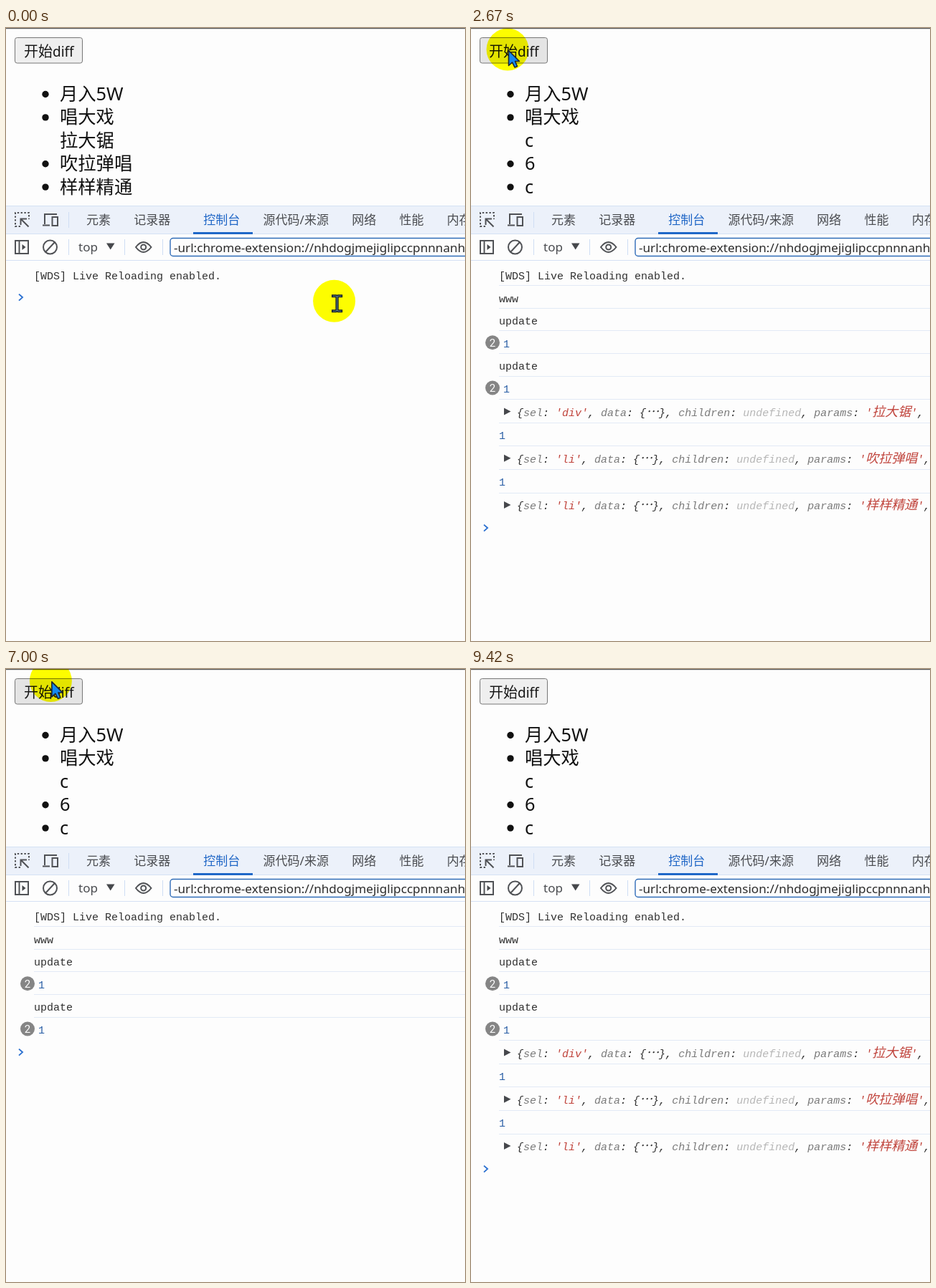
Recreate the animation shown at these times as an HTML page. Size 640 by 856 pixels, loop 9.51 s.

```html
<!DOCTYPE html>
<html lang="zh-CN">
<head>
<meta charset="utf-8">
<title>diff demo</title>
<style>
  html, body { margin: 0; width: 100%; height: 100%; overflow: hidden; background: #fdfdfd; }
  svg { display: block; width: 640px; height: 856px; }
  text { white-space: pre; font-family: "Noto Sans", "Noto Sans CJK SC", sans-serif; }
  .list { font-size: 25.3px; fill: #111; }
  .tab { font-size: 17px; fill: #4a4c50; }
  .log text { font-family: "Liberation Mono", "Noto Sans CJK SC", monospace; font-size: 15px; fill: #303030; }
  .log .num { fill: #2a5fa6; }
  .log .badge { font: 15px Roboto, sans-serif; fill: #fff; text-anchor: middle; }
  .log .obj { font-style: italic; }
  .wide { font-family: "Noto Sans CJK SC", sans-serif; font-size: 18px; font-weight: 300; }
  .key { fill: #7a7a7a; }
  .str { fill: #c0443c; }
  .undef { fill: #b6b6b6; }
  .icon { fill: none; stroke: #505256; stroke-width: 2; }
  .solid { fill: #46484c; stroke: none; }
</style>
</head>
<body>
<svg viewBox="0 0 640 856" xmlns="http://www.w3.org/2000/svg">
  <rect width="640" height="856" fill="#fdfdfd"/>
  <rect width="640" height="1.2" fill="#555"/>

  <rect id="button" x="12.5" y="13.5" width="94" height="35.5" rx="3" stroke="#777"/>
  <text x="25" y="40" font-size="20" fill="#161616">开始<tspan font-size="19">diff</tspan></text>
  <g id="list" class="list"></g>

  <rect y="248" width="640" height="40" fill="#ecf1fa"/>
  <path d="M0 248.5H640M0 287.5H640M0 324.5H640" stroke="#d5e1f4"/>
  <g id="tabs"></g>
  <rect x="261" y="285" width="83" height="3" fill="#1f68c8"/>
  <path d="M87.5 257V279M87.5 295V317M165.5 295V317M218.5 295V317" stroke="#cfdef4"/>

  <g class="icon">
    <path d="M20 277H13V258H32V267" stroke-dasharray="2.4 2.4"/>
    <path d="M31.5 277.5L21 267M20.5 275V266.5H29"/>
    <path d="M54 274V260H71M51 275.5H61"/>
    <rect x="64.5" y="264" width="7.5" height="12"/>
    <rect x="13" y="297" width="18" height="18"/>
    <path d="M18.5 297V315"/>
    <path class="solid" d="M22.5 302V310L27.5 306Z"/>
    <circle cx="61.5" cy="306" r="9.5"/>
    <path d="M68 299L55 313"/>
    <path d="M181 306Q191.5 292 202.5 306Q191.5 320 181 306Z"/>
    <circle cx="191.7" cy="306" r="3.5"/>
    <path class="solid" d="M140 300.5H151.5L145.7 309.5Z"/>
  </g>
  <text x="101" y="312" class="tab">top</text>
  <rect x="229" y="293.5" width="430" height="25" rx="4" fill="#fdfdfd" stroke="#2f6cb8" stroke-width="1.4"/>
  <text x="234" y="312.5" font-size="17.15" fill="#2c2c2c">-url:chrome-extension://nhdogjmejiglipccpnnnanh</text>

  <g id="log" class="log"></g>
  <path id="prompt" d="M-2.5 -4.5L2.5 0L-2.5 4.5" fill="none" stroke="#2b70d0" stroke-width="1.9"/>

  <g id="cursor">
    <circle r="29.5" fill="#ff0" style="mix-blend-mode:multiply"/>
    <path id="arrow" d="M1.5 1.5V22.5L6.5 18L10 25L13.5 23.5L10.5 16.5H16.5Z" fill="#1488f0" stroke="#1c2430" stroke-width="1.6" stroke-linejoin="round"/>
    <g id="beam" fill="none" stroke-linecap="square">
      <path id="bar" d="M-1.5 -7H2.5L4 -6L5.5 -7H9.5M4 -6V13M-1.5 14H2.5L4 13L5.5 14H9.5" stroke="#18202a" stroke-width="4.2"/>
      <use href="#bar" style="display:none"/>
    </g>
  </g>
</svg>
<script>
const LOOP = 9510;
const $ = id => document.getElementById(id);
const span = (cls, s) => `<tspan class="${cls}">${s}</tspan>`;
const text = (x, y, s, cls = '') => `<text x="${x}" y="${y}" class="${cls}">${s}</text>`;

// Tabs sit one after another; the panel label before the console has room for an icon.
let tabX = 112;
for (const name of ['元素', '记录器', '控制台', '源代码/来源', '网络', '性能', '内存']) {
  $('tabs').insertAdjacentHTML('beforeend', text(tabX, 274, name, 'tab'));
  const label = $('tabs').lastChild;
  if (name === '控制台') label.style.fill = '#1f66c6';
  tabX += label.getComputedTextLength() + (name === '记录器' ? 46 : 32.3);
}

const before = ['月入5W', '唱大戏', '拉大锯', '吹拉弹唱', '样样精通'];
const after = ['月入5W', '唱大戏', 'c', '6', 'c'];

function listMarkup(items) {
  return items.map((s, i) => {
    const y = 101 + i * 32.4;
    const dot = i === 2 ? '' : `<circle cx="55" cy="${y - 8.5}" r="4.7"/>`;
    return dot + text(75, y, s);
  }).join('');
}

// Rows holding objects are a little taller than plain ones.
const rowY = i => 509 + (i - 5) * (i < 5 ? 31.6 : 32.6);

const line = (s, cls) => y => text(39, y, s, cls);
const counted = y => `<circle cx="30" cy="${y - 6.5}" r="10" fill="#858585"/>` +
  text(30, y - 1, '2', 'badge') + text(45, y, '1', 'num');
const object = (sel, params) => y => {
  const fields = [
    ['sel', span('str', `'${sel}'`)],
    ['data', `{${span('wide', '…')}}`],
    ['children', span('undef', 'undefined')],
    ['params', span('str', `'${span('wide', params)}'`)]
  ];
  const body = fields.map(([key, value]) => `${span('key', key)}: ${value}, `).join('');
  return `<path class="solid" d="M46 ${y - 11}v10l9.5 -5z"/>` + text(64, y, '{' + body, 'obj');
};

const one = line('1', 'num');
const rows = [
  line('[WDS] Live Reloading enabled.'), line('www'),
  line('update'), counted, line('update'), counted,
  object('div', before[2]), one, object('li', before[3]), one, object('li', before[4])
];
$('log').innerHTML = rows.map((row, i) => {
  const y = rowY(i);
  const rule = i ? `<path d="M39 ${Math.floor(y - 23) + 0.5}H640" stroke="#e2eaf6"/>` : '';
  return `<g>${rule}${row(y)}</g>`;
}).join('');
const rowNodes = [...$('log').children];

// The page is clicked twice, with a reload in between.
const CLICK = 2330, RELOAD = 6500, SECOND_CLICK = 6830;
function logSize(t) {
  const since = t - (t < RELOAD ? CLICK : SECOND_CLICK);
  return since < 85 ? 1 : since < 250 ? 6 : rows.length;
}

// The cursor moves in five eased steps at the start of each half second.
// Each stop: half second, x, y.
const stops = [
  [-1, 458, 382], [0, 417, 369], [1, 274, 201], [2, 46, 37], [3, 51, 30],
  [9, 66, 48], [10, 120, -16], [11, 118, -95], [12, 64, 14], [13, 62, 17],
  [14, 151, 123], [15, 455, 811], [16, 465, 868], [18, 470, 930]
];
function cursorAt(t) {
  const clock = t + 170;
  const slot = Math.floor(clock / 500) - 1;
  const step = Math.min(5, Math.floor(clock % 500 / 83) + 1);
  const ease = Math.sin(step / 5 * Math.PI / 2);
  let x = 456, y = 378;
  for (const [when, toX, toY] of stops) {
    if (when > slot) break;
    const p = when < slot ? 1 : ease;
    x += (toX - x) * p;
    y += (toY - y) * p;
  }
  return [x, y];
}

let shown;
function draw(t) {
  const count = logSize(t);
  if (count !== shown) {
    shown = count;
    $('list').innerHTML = listMarkup(count > 1 ? after : before);
    rowNodes.forEach((row, i) => row.setAttribute('display', i < count ? 'inline' : 'none'));
    $('prompt').setAttribute('transform', `translate(20.5 ${rowY(count) - 6.5})`);
  }

  const [x, y] = cursorAt(t);
  const beam = t < CLICK && y > 325;
  $('cursor').setAttribute('transform', `translate(${x} ${y})`);
  $('beam').setAttribute('display', beam ? 'inline' : 'none');
  $('arrow').setAttribute('display', beam ? 'none' : 'inline');
  const hover = x > 11 && x < 106 && y > 11 && y < 48;
  $('button').setAttribute('fill', hover ? '#e4e4e4' : '#efefef');
}

// A lighter core inside the text cursor.
const core = $('bar').cloneNode();
core.removeAttribute('id');
core.setAttribute('stroke', '#5a8290');
core.setAttribute('stroke-width', 1.2);
$('beam').lastElementChild.replaceWith(core);

const begin = performance.now();
function tick() {
  draw((performance.now() - begin) % LOOP);
  requestAnimationFrame(tick);
}
tick();
</script>
</body>
</html>
```
